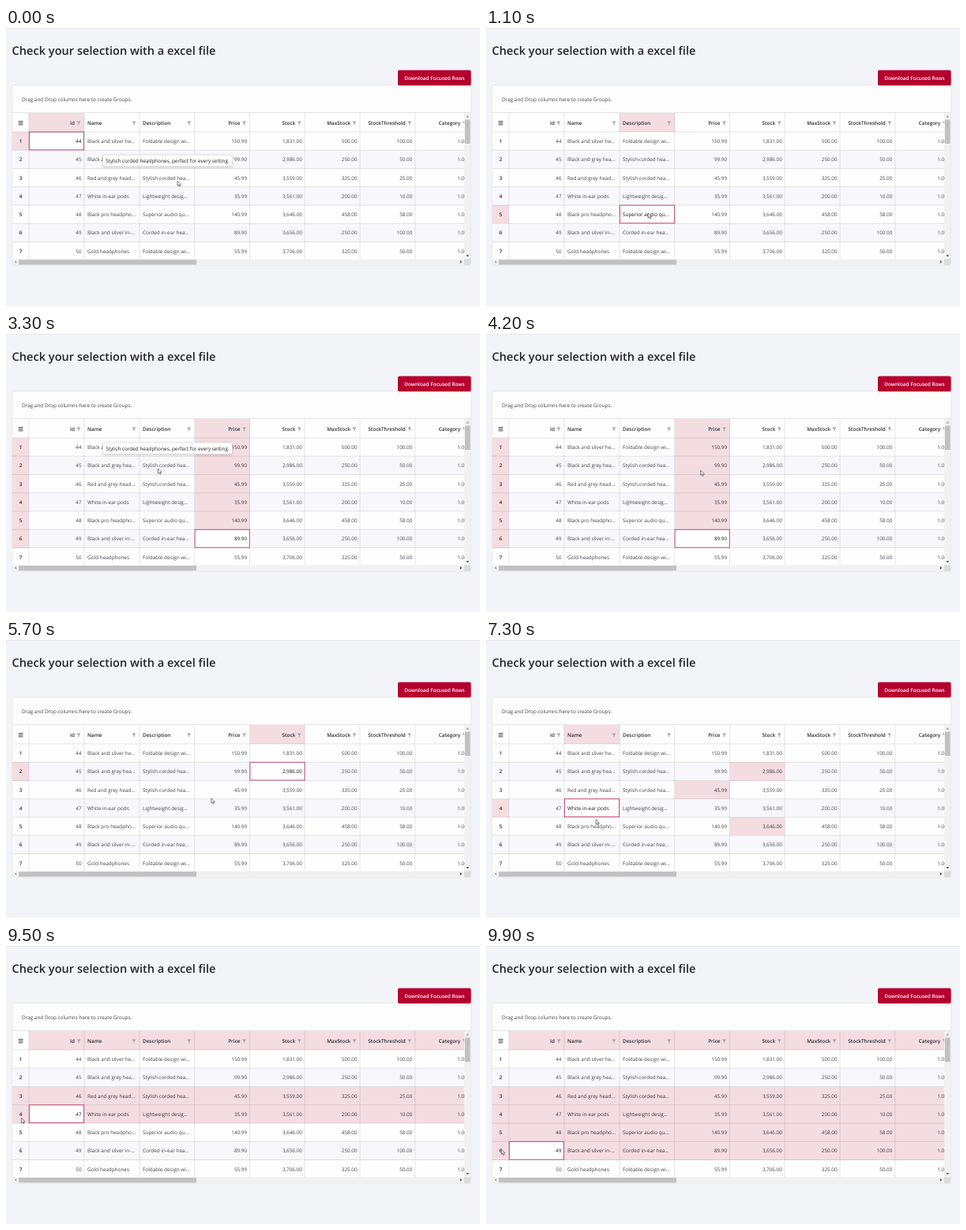
An HTML page that plays this animation: 600x353 px, repeating every 10000 ms.

```html
<!DOCTYPE html>
<html lang="en">
<head>
<meta charset="utf-8">
<title>Grid selection</title>
<style>
  html, body { margin: 0; width: 100%; height: 100%; overflow: hidden; background: #f3f4f8; }
  svg { display: block; }
  text {
    font: 400 6.4px "Open Sans", "Noto Sans", sans-serif;
    fill: #424246;
    text-rendering: geometricPrecision;
    white-space: pre;
  }
  .num { font-size: 6.3px; }
  .head { font-weight: 600; fill: #2b2b30; }
  .title { font-size: 14.62px; font-weight: 600; fill: #242429; }
  .button { font-size: 6.45px; font-weight: 600; fill: #fff; }
  .tip { fill: #1c1c1e; }
  .end { text-anchor: end; }
  .mid { text-anchor: middle; }
  .line { fill: #3c2846; fill-opacity: .12; }
</style>
</head>
<body>
<svg id="stage" width="600" height="353" xmlns="http://www.w3.org/2000/svg">
  <defs>
    <clipPath id="view"><rect x="8" y="108" width="572" height="185.5"/></clipPath>
    <filter id="shade" x="-10%" y="-40%" width="120%" height="200%">
      <feDropShadow dx="0" dy="1" stdDeviation="1.4" flood-color="#000" flood-opacity=".22"/>
    </filter>
  </defs>
</svg>
<script>
const LOOP = 10000, STEP = 100;
const PINK = '#f4dde1', RED = '#b5002f';
const edges = [8, 29, 99, 169, 238.7, 308.5, 378.3, 448, 517.8, 587.3];
const heads = ['', 'Id', 'Name', 'Description', 'Price', 'Stock', 'MaxStock', 'StockThreshold', 'Category'];
const data = [
  '44|Black and silver he…|Foldable design wi…|150.99|1,831.00|500.00|100.00',
  '45|Black and grey hea…|Stylish corded hea…|99.90|2,986.00|250.00|50.00',
  '46|Red and grey head…|Stylish corded hea…|45.99|3,559.00|325.00|25.00',
  '47|White in-ear pods|Lightweight desig…|35.99|3,561.00|200.00|10.00',
  '48|Black pro headpho…|Superior audio qu…|140.99|3,646.00|458.00|58.00',
  '49|Black and silver in-…|Corded in-ear hea…|89.90|3,656.00|250.00|100.00',
  '50|Gold headphones|Foldable design wi…|55.99|3,706.00|325.00|50.00'
].map((line, i) => [String(i + 1), ...line.split('|'), '1.00']);
const rowTop = r => r ? 132 + (r - 1) * 23.27 : 108;
const isLeft = c => c === 2 || c === 3;

const stage = document.getElementById('stage');
function add(parent, tag, attrs, content) {
  const el = document.createElementNS(stage.namespaceURI, tag);
  for (const k in attrs) el.setAttribute(k, attrs[k]);
  if (content) el.textContent = content;
  parent.append(el);
  return el;
}
const rect = (parent, x, y, width, height, fill, more) =>
  add(parent, 'rect', { x, y, width, height, fill, ...more });
const label = (parent, x, y, cls, content) => add(parent, 'text', { x, y, class: cls }, content);
const path = (parent, d, fill, more) => add(parent, 'path', { d, fill, ...more });

// Page, button and group panel
rect(stage, 0, 0, 600, 1, '#e6e6f1');
label(stage, 7.5, 34.4, 'title', 'Check your selection with a excel file');
rect(stage, 7.5, 72.5, 581, 229, '#fdfdfe', { stroke: '#e9e9ee', rx: 1.5 });
rect(stage, 496, 53.5, 92.6, 19.5, RED, { rx: 2 });
label(stage, 542.5, 65.7, 'button mid', 'Download Focused Rows');
label(stage, 20, 92.9, '', 'Drag and Drop columns here to create Groups.');

// Grid cells; row 0 is the header
const grid = add(stage, 'g', { 'clip-path': 'url(#view)' });
const cells = [];
for (let r = 0; r <= data.length; r++) {
  const y = rowTop(r), h = rowTop(r + 1) - y, base = y + h / 2 + (r ? 2.4 : 2.9);
  cells[r] = heads.map((head, c) => {
    const x = edges[c], right = edges[c + 1];
    const fill = r && r % 2 === 0 ? '#f8f8fc' : '#fefefe';
    const box = rect(grid, x, y, right - x, h, fill, { 'shape-rendering': 'crispEdges' });
    let text = null;
    if (!c) {
      if (r) text = label(grid, 18.5, base, 'head mid', data[r - 1][0]);
    } else {
      const at = isLeft(c) ? x + 4 : right - (r ? 3.5 : 12);
      const cls = (r ? (isLeft(c) ? '' : 'num') : 'head') + (isLeft(c) ? '' : ' end');
      text = label(grid, at, base, cls, r ? data[r - 1][c] : head);
      if (!r) path(grid, `M${right - 9.6} 118.4h5.2l-2 2.5v2.6l-1.2-.7v-1.9z`, '#a9a5ab');
    }
    return { box, text, fill };
  });
}
for (let i = 0; i < 3; i++) rect(grid, 15.7, 118 + i * 2.2, 5.8, .9, '#2c2c30');
edges.slice(1, -1).forEach(x => rect(grid, x - .5, 108, 1, 186, '', { class: 'line' }));
for (let r = 1; r <= 7; r++) rect(grid, 8, rowTop(r) - .6, 572, 1, '', { class: 'line' });
rect(stage, 8, 107, 580, 1, '', { class: 'line' });
const focusBox = rect(grid, 0, 0, 69.2, 22.8, 'none', { stroke: '#c64a6c' });

// Scrollbars
rect(stage, 580, 108, 8.3, 193.3, '#f1f1f2');
rect(stage, 8, 293.5, 580, 7.8, '#f1f1f2');
rect(stage, 580, 293.5, 8.3, 7.8, '#dcdcdd');
rect(stage, 581, 116.5, 6.6, 30.5, '#c1c1c2');
rect(stage, 16, 294.2, 225, 6.3, '#c1c1c2');
path(stage, 'M582.4 113.4h4l-2-2.4z', '#a3a3a5');
path(stage, 'M582.4 288.2h4l-2 2.4zM574.9 295.1v4l2.4-2z', '#505052');
path(stage, 'M13.2 295.1v4l-2.4-2z', '#a3a3a5');

// Tooltip and pointer
const tip = add(stage, 'g', {});
const tipBox = rect(tip, 0, 0, 10, 14.5, '#fff', { rx: 2, stroke: '#d3d3d6', 'stroke-width': .6, filter: 'url(#shade)' });
const tipText = label(tip, 204.4, 0, 'tip mid', '');
const pointer = path(stage, 'M0 0V6.2L1.5 4.9L2.6 7.2L3.6 6.7L2.6 4.6H4.6Z', '#fff',
  { stroke: '#48484c', 'stroke-width': .7, 'stroke-linejoin': 'round' });

// Selections: start, focused column and row, column span, row span, extra cells
const picks = [
  { at: 0, col: 1, row: 1 },
  { at: 900, col: 3, row: 5 },
  { at: 2300, col: 4, row: 1 },
  ...[2, 3, 4, 5, 6].map(row => ({ at: 2300 + (row - 1) * 100, col: 4, row, rows: [1, row] })),
  { at: 5100, col: 5, row: 2 },
  { at: 6100, col: 4, row: 3, extra: ['5,2'] },
  { at: 6600, col: 5, row: 5, extra: ['5,2', '4,3'] },
  { at: 7100, col: 2, row: 4, extra: ['5,2', '4,3', '5,5'] },
  ...[3, 4, 5, 6].map(row => ({ at: 9300 + (row - 3) * 150, col: 1, row, cols: [1, 8], rows: [3, row] }))
];
const tips = [
  { from: 0, to: 400, row: 3 },
  { from: 1600, to: 2000, row: 4 },
  { from: 3200, to: 3700, row: 2 }
];
const tipWords = row => row === 4
  ? 'Lightweight design with high-quality audio.'
  : 'Stylish corded headphones, perfect for every setting.';

// Pointer stops: time, x, y
const stops = [
  [0, 217, 194.3], [300, 215, 198], [800, 205, 235], [1300, 205, 235], [1600, 221, 213],
  [1900, 263.5, 185.5], [2200, 273, 143], [2300, 273, 145], [2800, 273, 260], [2950, 273, 260],
  [3300, 192.5, 171], [3700, 198, 170], [4400, 290, 174], [5000, 341, 167], [5200, 341, 167],
  [5700, 259.8, 201], [6000, 273, 190], [6150, 273, 190], [6500, 343, 236], [6650, 343, 236],
  [7000, 134, 214], [7150, 134, 214], [7300, 139, 228], [7800, 139, 228], [8800, 25, 148.5],
  [9200, 19.5, 189], [9300, 19.5, 190], [9750, 19.5, 258.3], [10000, 19.5, 258.3]
];

function pointerAt(t) {
  const i = stops.findIndex(s => s[0] > t);
  const [t0, x0, y0] = stops[i - 1], [t1, x1, y1] = stops[i];
  const p = (t - t0) / (t1 - t0), k = p * p * (3 - 2 * p);
  return [x0 + (x1 - x0) * k, y0 + (y1 - y0) * k];
}

function showPick({ col, row, cols = [col, col], rows = [row, row], extra = [] }) {
  const within = (v, [a, b]) => v >= a && v <= b;
  cells.forEach((line, r) => line.forEach(({ box, text, fill }, c) => {
    const inCol = within(c, cols), inRow = within(r, rows);
    const focused = c === col && r === row;
    const marked = r === 0 ? inCol : c === 0 ? inRow : inCol && inRow || extra.includes(c + ',' + r);
    box.setAttribute('fill', focused ? '#fff' : marked ? PINK : fill);
    if (text && r && c) text.style.fill = focused ? '#151517' : marked ? '#38353a' : '';
  }));
  focusBox.setAttribute('x', edges[col] + .4);
  focusBox.setAttribute('y', rowTop(row));
}

function showTip(t) {
  const now = tips.find(s => t >= s.from && t < s.to);
  tip.setAttribute('visibility', now ? 'visible' : 'hidden');
  if (!now) return;
  const y = rowTop(now.row) - 17.4;
  tipText.textContent = tipWords(now.row);
  tipText.setAttribute('y', y + 9.7);
  const w = tipText.getComputedTextLength() + 7;
  tipBox.setAttribute('x', 204.4 - w / 2);
  tipBox.setAttribute('y', y);
  tipBox.setAttribute('width', w);
}

let last = -1;
function draw() {
  const t = Math.floor(performance.now() % LOOP / STEP) * STEP;
  if (t !== last) {
    last = t;
    showPick(picks.filter(p => p.at <= t).pop());
    showTip(t);
    pointer.setAttribute('transform', `translate(${pointerAt(t)})`);
  }
  requestAnimationFrame(draw);
}
draw();
</script>
</body>
</html>
```
